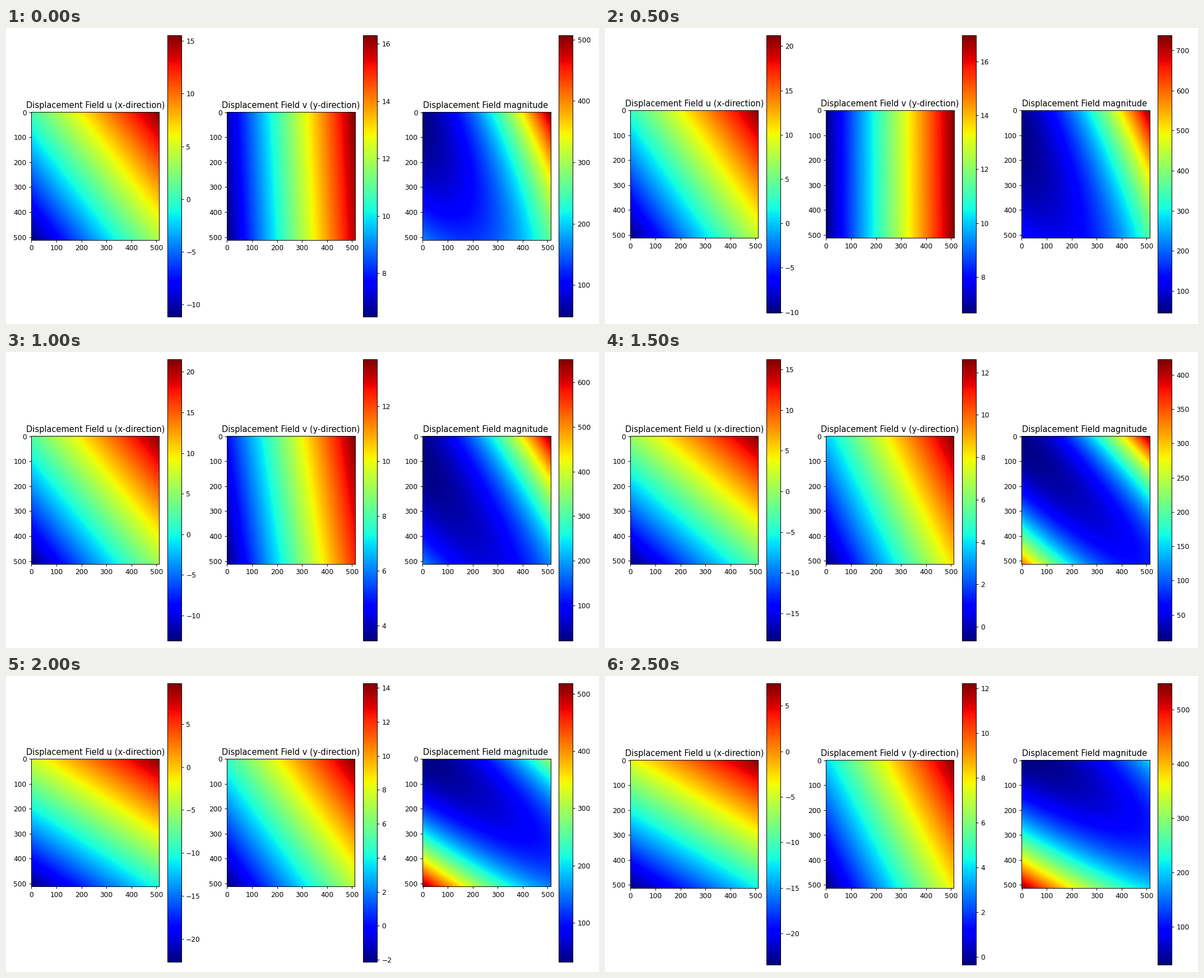
A matplotlib script that plays this animation: 1058x529 px, repeating every 3000 ms.

```python
import matplotlib.pyplot as plt
import numpy as np
from matplotlib.animation import FuncAnimation

WIDTH, HEIGHT = 1058, 529
DPI = HEIGHT / 6
SIZE = 512
STEPS = 6
STEP_MS = 500

plt.rcParams["font.family"] = "DejaVu Sans"
plt.rcParams["axes.titlesize"] = 11.92
MARGINS = {side: plt.rcParams[f"figure.subplot.{side}"]
           for side in ("left", "right", "bottom", "top", "wspace", "hspace")}

t = np.linspace(0, 1, SIZE)
X, Y = np.meshgrid(t, t)

fig = plt.figure(figsize=(WIDTH / DPI, HEIGHT / DPI), dpi=DPI)


def wave(step, base, amp, speed, peak, drift=0):
    return base + drift * step + amp * np.cos(speed * (step - peak))


def plane(low, high, level):
    """Plane from low (bottom left) to high (top right); level sets the top left."""
    return low + (high - low) * (level + (1 - level) * X - level * Y)


def field_u(k):
    return plane(low=wave(k, -16.8, 6.85, 0.8, 0.75),
                 high=wave(k, 14.8, 7.4, 0.95, 1.55),
                 level=wave(k, 0.52, 0.11, 0.8, 4.8))


def field_v(k):
    return plane(low=wave(k, 4.45, 3.2, 1.1, 0.8, drift=-0.9),
                 high=wave(k, 16.3, 1.6, 1.85, 0.85, drift=-0.87),
                 level=wave(k, 0.21, 0.21, 0.95, 4.05))


def show_field(ax, field, title):
    image = ax.imshow(field, cmap="jet")
    ax.set_title(title)
    fig.colorbar(image, ax=ax)


def draw(step):
    fig.clear()
    # Start each layout from the default margins, so it never depends on the last one
    fig.subplots_adjust(**MARGINS)
    u, v = field_u(step), field_v(step)
    left, middle, right = fig.subplots(1, 3)
    show_field(left, u, "Displacement Field u (x-direction)")
    show_field(middle, v, "Displacement Field v (y-direction)")
    show_field(right, u**2 + v**2, "Displacement Field magnitude ")
    fig.tight_layout()
    return []


anim = FuncAnimation(fig, draw, frames=STEPS, init_func=lambda: draw(0),
                     interval=STEP_MS, repeat=True, repeat_delay=0, blit=False)
plt.show()
```
